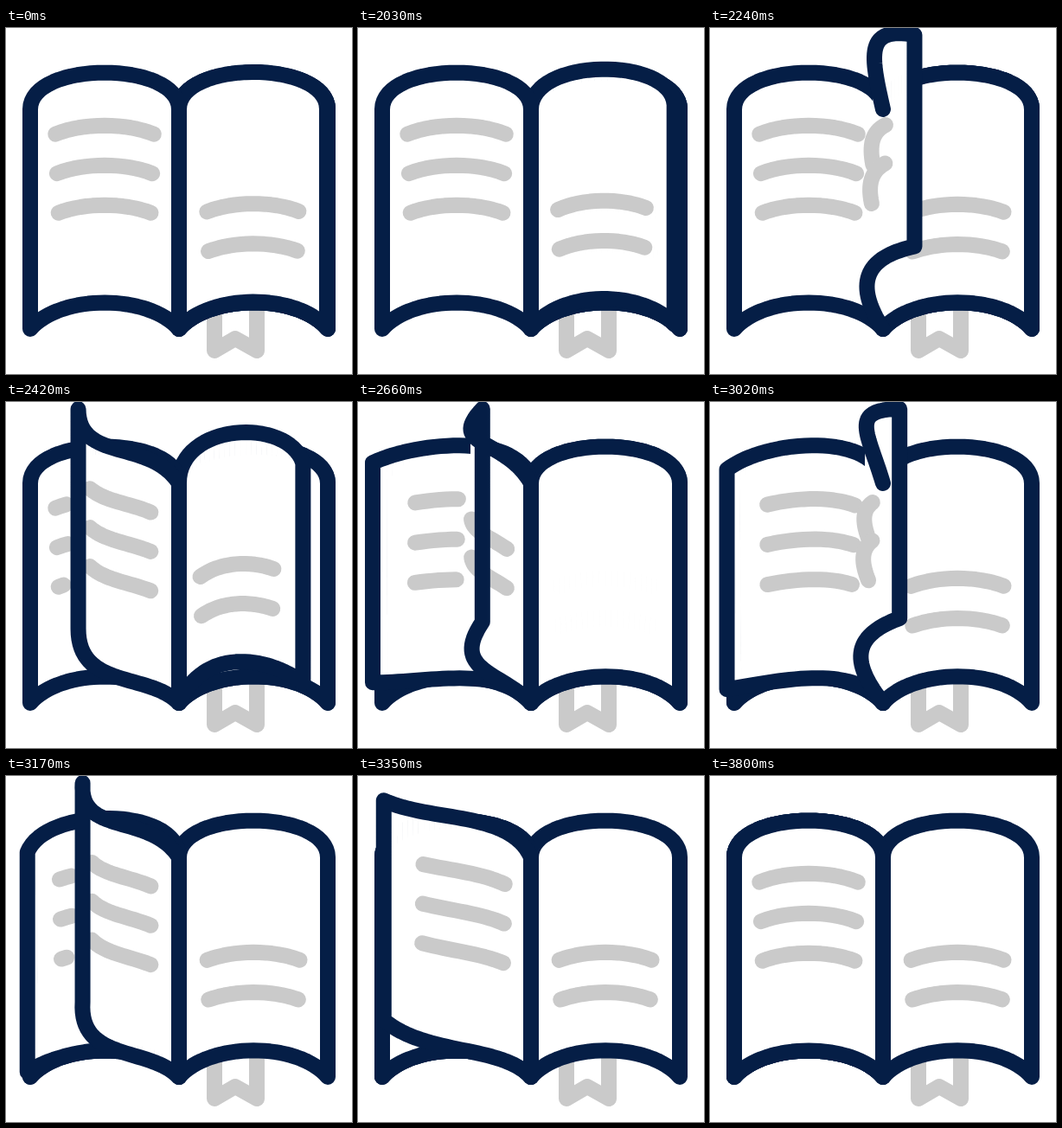
An HTML page with a canvas for the animation above (3.83 s loop, 400 by 400 pixels).

```html
<!DOCTYPE html>
<html lang="en">
<head>
<meta charset="utf-8">
<title>Book</title>
<style>
html, body { margin: 0; width: 100%; height: 100%; overflow: hidden; background: #fff; }
canvas { display: block; width: 400px; height: 400px; }
</style>
</head>
<body>
<canvas id="stage" width="400" height="400"></canvas>
<script>
const ctx = document.getElementById('stage').getContext('2d');
const LOOP = 3830, HOLD = 2030, END = 1060;
const STARTS = [1980, 2300, 2740];
const NAVY = '#051e46', GRAY = '#cacaca';
const SPINE = 200, TOP = 94, BOTTOM = 348;
const FRONT = [0.573, 0.747], BACK = [0.23, 0.403, 0.576];

// One page turn: time, x of the free edge, its lift, turn of its curl in degrees
const TURN = [
  [0, 372, 0, 0],
  [130, 340, 26, 20],
  [280, 220, 98, 90],
  [440, 84, 86, 180],
  [610, 30, 66, 245],
  [680, 17, 24, 295],
  [730, 20, 15, 310],
  [END, 28, 0, 360]
];

// Smooth interpolation without overshoot, at rest at both ends
function track(t, col) {
  const last = TURN.length - 1;
  t = Math.min(END, Math.max(0, t));
  let i = 0;
  while (i < last - 1 && t >= TURN[i + 1][0]) i++;
  const slope = k => (TURN[k + 1][col] - TURN[k][col]) / (TURN[k + 1][0] - TURN[k][0]);
  const tangent = k => {
    if (k === 0 || k === last) return 0;
    const a = slope(k - 1), b = slope(k);
    return a * b > 0 ? 2 * a * b / (a + b) : 0;
  };
  const h = TURN[i + 1][0] - TURN[i][0], u = (t - TURN[i][0]) / h;
  const u2 = u * u, u3 = u2 * u, ease = 3 * u2 - 2 * u3;
  return TURN[i][col] + slope(i) * h * ease
    + h * (tangent(i) * (u3 - 2 * u2 + u) + tangent(i + 1) * (u3 - u2));
}

function bezier(a, b, c, d, n = 32) {
  return Array.from({ length: n + 1 }, (_, i) => {
    const s = i / n, r = 1 - s;
    return [0, 1].map(k =>
      r * r * r * a[k] + 3 * r * r * s * b[k] + 3 * r * s * s * c[k] + s * s * s * d[k]);
  });
}

const rad = deg => deg * Math.PI / 180;
const polar = ([x, y], len, deg) => [x + len * Math.cos(rad(deg)), y + len * Math.sin(rad(deg))];

// The handles at the free corners swing round as the page turns
function makePage(t, hasFront) {
  const x = track(t, 1), lift = track(t, 2), turn = track(t, 3);
  const sway = Math.sin(rad(turn / 2)) ** 2;
  const rise = lift * (1 - sway) ** 4;
  const hi = [x, Math.max(8, TOP - lift)], lo = [x, BOTTOM - lift];
  const lean = 35 * Math.cos(rad(Math.min(turn * 2, 180)));
  return {
    turn, hasFront,
    top: bezier([SPINE, TOP], [SPINE - 34 * sway, 37.5 + 4 * sway - 0.65 * rise],
      polar(hi, 56.5 + 6 * sway, -90 - turn), hi),
    bottom: bezier([SPINE, BOTTOM], [SPINE + lean, 307.5 + 5 * sway - 1.1 * rise],
      polar(lo, 54 + 16 * sway, -130 - 0.775 * turn), lo)
  };
}

function trace(pts, close) {
  ctx.beginPath();
  pts.forEach(p => ctx.lineTo(p[0], p[1]));
  if (close) ctx.closePath();
}

function stroke(pts, color, close, width = 18) {
  trace(pts, close);
  ctx.strokeStyle = color;
  ctx.lineWidth = width;
  ctx.stroke();
}

// Text follows the paper: a blend of the top and bottom curves
function textLine({ top, bottom }, v, limit) {
  const n = top.length - 1, margin = Math.round(n * 0.256);
  const pts = top.map((p, i) => p.map((q, k) => q + (bottom[i][k] - q) * v))
    .slice(margin, n - margin + 1)
    .filter(p => p[0] <= limit);
  if (pts.length > 1) stroke(pts, GRAY);
}

function drawPage(page, spine, limit = 400) {
  const { top, bottom, turn, hasFront } = page;
  ctx.fillStyle = '#fff';
  for (let i = 0; i + 1 < top.length; i++) {
    const strip = [top[i], top[i + 1], bottom[i + 1], bottom[i]];
    trace(strip, true);
    ctx.fill();
    stroke(strip, '#fff', true, 1);
  }
  if (turn < 60 && hasFront) FRONT.forEach(v => textLine(page, v, limit));
  if (turn > 75) BACK.slice(turn < 155 ? 1 : 0).forEach(v => textLine(page, v, limit));
  stroke(top.concat(bottom.slice().reverse()), NAVY, spine);
}

function draw(time) {
  const pages = STARTS.map((start, k) => {
    const age = k === 0 && time < HOLD ? 20 : time - start;
    return makePage(age, k < 2);
  });
  const spine = !pages.some(p => p.turn > 60 && p.turn < 120);
  const right = pages.filter(p => p.turn < 70).reverse();
  const left = [makePage(END), ...pages.filter(p => p.turn >= 70)];

  ctx.fillStyle = '#fff';
  ctx.fillRect(0, 0, 400, 400);
  stroke([[241, 320], [241, 373], [265, 359], [290, 373], [290, 320]], GRAY);
  drawPage(makePage(0, true), spine);
  right.forEach(p => drawPage(p, spine));
  left.forEach((p, i) => {
    const next = left[i + 1];
    const limit = next ? Math.min(...next.top.map(q => q[0])) - 12 : 400;
    drawPage(p, spine, limit);
  });
}

ctx.lineCap = ctx.lineJoin = 'round';
const begin = performance.now();
function tick() {
  draw((performance.now() - begin) % LOOP);
  requestAnimationFrame(tick);
}
tick();
</script>
</body>
</html>
```
